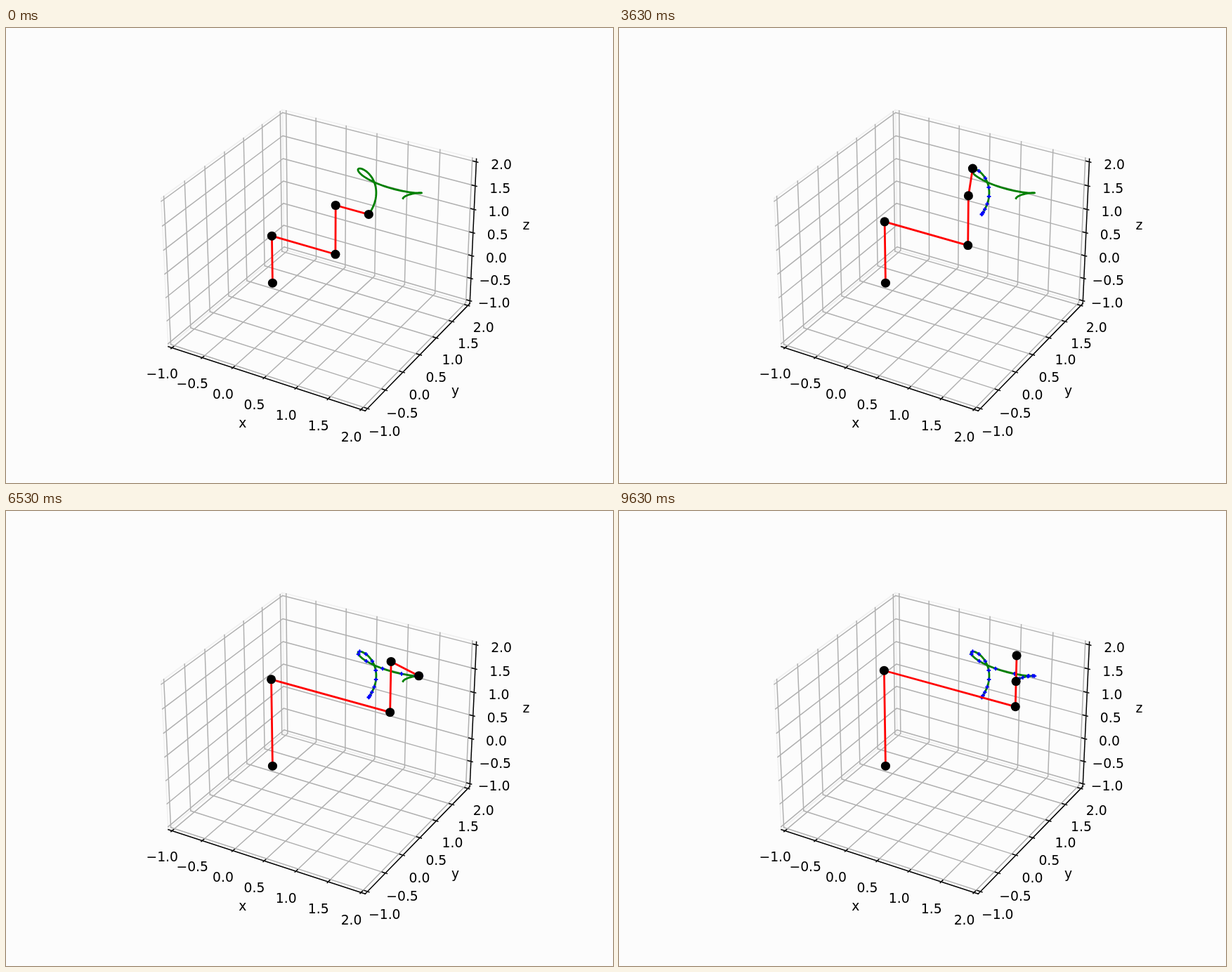
Write an HTML page with a canvas that moves like this. It is 864 by 648 pixels and loops after 9.73 s.

```html
<!DOCTYPE html>
<html lang="en">
<head>
<meta charset="utf-8">
<title>Robot arm trajectory</title>
<style>
html, body { margin: 0; width: 100%; height: 100%; overflow: hidden; background: #fcfcfc; }
canvas { display: block; width: 864px; height: 648px; }
</style>
</head>
<body>
<canvas id="stage" width="864" height="648"></canvas>
<script>
const LOOP = 9730, STEP = 100, FIRST_EXTRA = 30;
const LOW = -1.0625, HIGH = 2.0625;          // walls of the plot box
const LABEL_GAP = 0.2593, TITLE_GAP = 0.5637;
const TICKS = [-1, -0.5, 0, 0.5, 1, 1.5, 2];
const ctx = document.getElementById('stage').getContext('2d');

// Perspective camera: azimuth -60 deg, elevation 30 deg, distance 10.
function project([x, y, z]) {
  const X = (x - 0.5) * 8 / 21, Y = (y - 0.5) * 8 / 21, Z = (z - 0.5) * 2 / 7;
  const r = Math.sqrt(3) / 2;
  const depth = 10 - (r / 2 * X - 0.75 * Y + 0.5 * Z);
  const right = (r * X + 0.5 * Y) / depth;
  const up = (-0.25 * X + r / 2 * Y + r * Z) / depth;
  const scale = 498.96 / 0.185;
  return [193.32 + (right + 0.095) * scale, 576.72 - (up + 0.095) * scale];
}

function polyline(points, color, width, cap = 'square') {
  ctx.beginPath();
  points.forEach(p => ctx.lineTo(...project(p)));
  ctx.strokeStyle = color;
  ctx.lineWidth = width;
  ctx.lineCap = cap;
  ctx.lineJoin = 'round';
  ctx.stroke();
}

function label(text, point, baseline) {
  const [x, y] = project(point);
  ctx.fillStyle = '#000';
  ctx.fillText(text, x, y + baseline);
}

const axes = [
  {
    name: 'x',
    grid: v => [[v, HIGH, HIGH], [v, HIGH, LOW], [v, LOW, LOW]],
    edge: (v, gap) => [v, LOW - gap, LOW - gap],
    tick: (v, d) => [v, LOW - d, LOW]
  },
  {
    name: 'y',
    grid: v => [[LOW, v, HIGH], [LOW, v, LOW], [HIGH, v, LOW]],
    edge: (v, gap) => [HIGH + gap, v, LOW - gap],
    tick: (v, d) => [HIGH + d, v, LOW]
  },
  {
    name: 'z',
    grid: v => [[LOW, LOW, v], [LOW, HIGH, v], [HIGH, HIGH, v]],
    edge: (v, gap) => [HIGH + gap, HIGH + gap, v],
    tick: (v, d) => [HIGH + d, HIGH, v]
  }
];

function drawAxes() {
  ctx.font = '18.75px "DejaVu Sans", sans-serif';
  ctx.textAlign = 'center';
  for (const axis of axes) {
    polyline(axis.grid(LOW), '#f0f0f0', 1.5);
    polyline(axis.grid(HIGH), '#f0f0f0', 1.5);
  }
  for (const axis of axes) {
    polyline([axis.edge(LOW, 0), axis.edge(HIGH, 0)], '#000', 1.5);
    label(axis.name, axis.edge(0.5, TITLE_GAP), 5.1);
    TICKS.forEach(v => polyline(axis.grid(v), '#b0b0b0', 1.5));
    for (const v of TICKS) {
      polyline([axis.tick(v, 0.025), axis.tick(v, -0.05)], '#000', 1.5);
      label(v.toFixed(1).replace('-', '\u2212'), axis.edge(v, LABEL_GAP), 14.3);
    }
  }
}

// Two sliding joints and two turning joints share one quintic easing.
const ease = u => u * u * u * (10 - 15 * u + 6 * u * u);
const progress = n => n === 0 ? 0 : Math.min(1, (n + 1.7) / 97);

function arm(u) {
  const s = ease(u), reach = 1 + s, angle = 1.5 * Math.PI * s;
  const c = Math.cos(angle), k = Math.sin(angle);
  return [
    [0, 0, 0],
    [0, 0, reach],
    [reach, 0, reach],
    [reach, 0, reach + 1],
    [reach + 0.5 * c * c, 0.5 * k * c, reach + 1 + 0.5 * k]
  ];
}

const tip = u => arm(u)[4];
const path = Array.from({ length: 200 }, (_, i) => tip(i / 199));

function plus(point) {
  const [x, y] = project(point), h = 2.8;
  ctx.beginPath();
  ctx.moveTo(x - h, y);
  ctx.lineTo(x + h, y);
  ctx.moveTo(x, y - h);
  ctx.lineTo(x, y + h);
  ctx.strokeStyle = '#00f';
  ctx.lineWidth = 1.9;
  ctx.lineCap = 'butt';
  ctx.stroke();
}

function dot(point) {
  ctx.beginPath();
  ctx.arc(...project(point), 6.56, 0, 2 * Math.PI);
  ctx.fillStyle = '#000';
  ctx.fill();
}

function draw(time) {
  const n = Math.max(0, Math.floor((time % LOOP - FIRST_EXTRA) / STEP));
  const joints = arm(progress(n));
  ctx.fillStyle = '#fcfcfc';
  ctx.fillRect(0, 0, 864, 648);
  drawAxes();
  polyline(path, '#008000', 2.8);
  for (let i = 0; i <= n; i += 4) plus(tip(progress(i)));
  polyline(joints, '#f00', 2.8);
  joints.forEach(dot);
}

const start = performance.now();
function tick() {
  draw(performance.now() - start);
  requestAnimationFrame(tick);
}
tick();
</script>
</body>
</html>
```
